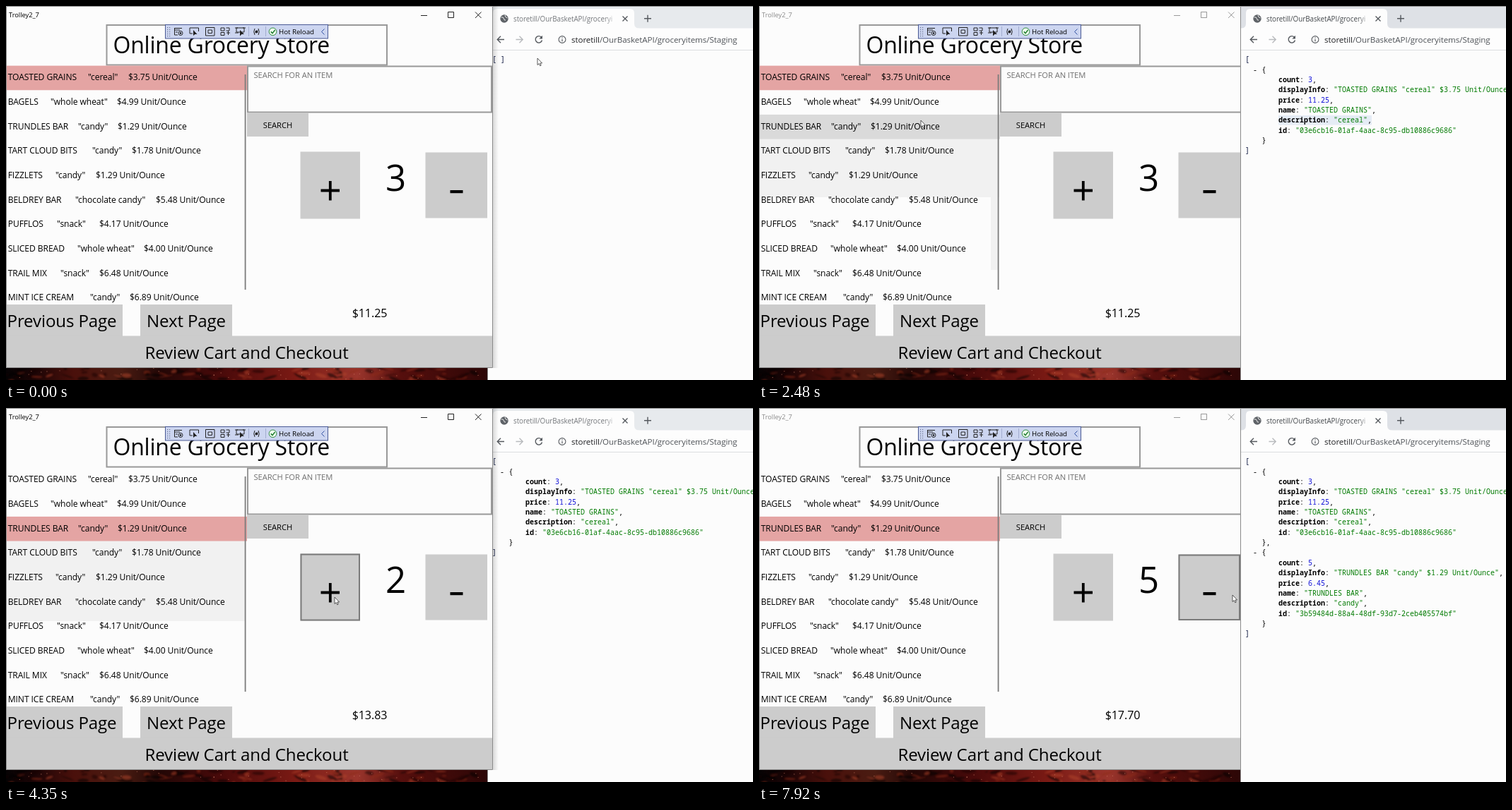
Recreate the animation shown at these times as an HTML page. Size 1057x530 px, loop 8 s.

```html
<!DOCTYPE html>
<html lang="en">
<head>
<meta charset="utf-8">
<title>Grocery store demo</title>
<style>
html, body { margin: 0; width: 100%; height: 100%; overflow: hidden; background: #fcfcfc; }
svg { display: block; width: 1057px; height: 530px; }
text { font-family: "Open Sans", "Noto Sans", sans-serif; letter-spacing: -.006em; fill: #000; white-space: pre; }
.mono text { font: 500 10px "Noto Sans Mono", "DejaVu Sans Mono", monospace; letter-spacing: 0; }
.mono .key { font-weight: 700; }
.mono .str { fill: #007a00; }
.mono .num { fill: #1010d8; }
.mono .outer { fill: #061038; }
.line { fill: none; stroke: #222; stroke-width: 1; }
.nav { fill: none; stroke: #55595e; stroke-width: 1.4; }
</style>
</head>
<body>
<svg id="stage" viewBox="0 0 1057 530"></svg>
<script>
const LOOP = 8000;
const ROW_H = 34.65;
const rowTop = i => 84.6 + i * ROW_H;

const rect = (x, y, w, h, fill, extra = '') =>
  `<rect x="${x}" y="${y}" width="${w}" height="${h}" fill="${fill}" ${extra}/>`;
const frame = (x, y, w, h, color, extra = '') =>
  rect(x + 1, y + 1, w - 2, h - 2, 'none', `stroke="${color}" stroke-width="2" ${extra}`);
const text = (x, y, size, str, extra = '') =>
  `<text x="${x}" y="${y}" font-size="${size}" ${extra}>${str}</text>`;
const path = (d, cls = 'line', extra = '') => `<path class="${cls}" d="${d}" ${extra}/>`;
const mid = 'text-anchor="middle"';

const items = [
  ['TOASTED GRAINS', 'cereal', 116, '3.75', 173],
  ['BAGELS', 'whole wheat', 63, '4.99', 157],
  ['TRUNDLES BAR', 'candy', 102, '1.29', 158],
  ['TART CLOUD BITS', 'candy', 122, '1.78', 178],
  ['FIZZLETS', 'candy', 70, '1.29', 127],
  ['BELDREY BAR', 'chocolate candy', 98, '5.48', 212],
  ['PUFFLOS', 'snack', 72, '4.17', 132],
  ['SLICED BREAD', 'whole wheat', 101, '4.00', 195],
  ['TRAIL MIX', 'snack', 77, '6.48', 132],
  ['MINT ICE CREAM', 'candy', 119, '6.89', 175]
];

function wallpaper() {
  let seed = 7;
  const rnd = () => (seed = seed * 16807 % 2147483647) / 2147483647;
  const tones = ['#000', '#180304', '#8c2a18', '#050102', '#b0442c'];
  const stops = [[0, '#060304'], [.06, '#1c0506'], [.14, '#4a100b'], [.24, '#4a1c12'], [.32, '#220706'],
    [.45, '#4a0a0a'], [.6, '#7a1a14'], [.73, '#9a352c'], [.82, '#560f0d'], [1, '#2c0606']];
  let out = `<defs><linearGradient id="sky">${stops.map(([o, c]) =>
    `<stop offset="${o}" stop-color="${c}"/>`).join('')}</linearGradient>
    <filter id="soft"><feGaussianBlur stdDeviation="1"/></filter></defs>` + rect(0, 505, 681, 25, 'url(#sky)');
  out += '<g filter="url(#soft)" opacity=".5">';
  for (let i = 0; i < 110; i++) {
    const x = rnd() * 670, y = 511 + rnd() * 20;
    out += `<ellipse cx="${x}" cy="${y}" rx="${2 + rnd() * 9}" ry="${.6 + rnd() * 2.4}" fill="${tones[i % 5]}" transform="rotate(${rnd() * 50 - 25} ${x} ${y})"/>`;
  }
  out += '</g>';
  for (let i = 0; i < 40; i++) out += `<circle cx="${rnd() * 681}" cy="${513 + rnd() * 16}" r=".6" fill="#d98a70" opacity=".7"/>`;
  return out;
}

function debugBar() {
  let dots = '';
  for (let i = 0; i < 10; i++) dots += rect(228 + i % 2 * 3, 30 + (i >> 1) * 3, 1.2, 1.2, '#6f7896');
  return rect(225.5, 26.5, 230, 19.5, '#ccd5f0', 'stroke="#4a5a94"') + dots +
    path('M238.5 31.5H249M238.5 34H246M238.5 31V41H243M240 37H243') +
    '<circle class="line" cx="247" cy="38.5" r="3"/><circle cx="247" cy="38.5" r="1.2"/>' +
    path('M264 39H260V31H272.5V36') + path('M265 34L265 42 267.5 40 270.5 40Z', '', 'fill="#222"') +
    path('M282.5 30.5H295V42H282.5ZM286 34H291.5V38.5H286Z') +
    path('M304 31H309V35H304ZM304 37.5H309V41.5H304ZM311.5 31H316V35H311.5M312 38H317M314.5 35.5V41') +
    path('M326 31H337V37H326ZM324 31H328M335 31H339M324 38H329') +
    path('M331 34L331 42.5 333.5 40 337 40Z', '', 'fill="#222"') +
    path('M343.5 29V43M367.5 29V43', 'line', 'style="stroke:#a3add0"') +
    path('M352 32Q349.5 36.5 352 41M357 32Q359.5 36.5 357 41M352.5 38L356.5 34.5') +
    '<circle cx="354.5" cy="36.5" r="2" fill="#222"/>' +
    '<circle cx="377.5" cy="36.3" r="5.3" fill="#eefbee" stroke="#2d8c3c"/>' +
    path('M374.8 36.4L377 38.6 380.6 34', 'line', 'style="stroke:#1f7d2f;stroke-width:1.5"') +
    text(386, 39.6, 9.8, 'Hot Reload') + path('M450.5 32.5L446.5 36.5 450.5 40.5', 'line', 'style="stroke:#2f4ea0"');
}

function appWindow() {
  const rows = items.map(([name, kind, kx, price, px], i) => {
    const y = rowTop(i) + 20.8;
    return text(2.7, y, 12.1, name) + text(kx, y, 12.1, `"${kind}"`) + text(px, y, 12.1, `$${price} Unit/Ounce`);
  }).join('');
  return `<defs><linearGradient id="shade"><stop stop-opacity=".16"/><stop offset="1" stop-opacity="0"/></linearGradient></defs>` +
    rect(688, 0, 9, 513, 'url(#shade)') + rect(0, 0, 688.5, 513, '#fcfcfc') +
    `<g id="caption">${text(4, 16, 9.4, 'Trolley2_7')}
      ${path('M587 13.5H596M625.5 8.5H633.5V16.5H625.5ZM664 8.5L672.5 17M672.5 8.5L664 17')}</g>` +
    frame(141.5, 26, 398.5, 58.5, '#999') + text(151.5, 67, 31.95, 'Online Grocery Store') + debugBar() +
    `<g id="ghost1">${rect(0, 223, 340, 48, '#f1f1f1')}${rect(328, 271, 10, 103, '#f1f1f1')}</g>` +
    `<g id="ghost2">${rect(0, 188, 340, 35, '#f1f1f1')}</g>` +
    `<g id="ghost3">${rect(0, 188, 338, 114, '#f1f1f1')}</g>` +
    rect(0, 0, 341, ROW_H, '#dadada', 'id="hover"') + rect(0, 0, 341, ROW_H, '#e4a4a3', 'id="selected"') +
    rows + rect(337.7, 97, 1.8, 305, '#7c7c7c') +
    frame(341, 84.5, 347, 67, '#999', 'id="searchBox"') +
    text(350.5, 101.6, 11.2, 'SEARCH FOR AN ITEM', 'style="fill:#707070"') +
    rect(341, 152, 87, 33, '#ccc') + text(384.5, 172.6, 11.2, 'SEARCH', mid) +
    rect(416.5, 206.5, 84.5, 95, '#ccc', 'id="plus"') + frame(416.5, 206.5, 84.5, 95, '#7a7a7a', 'id="plusEdge"') +
    path('M445.5 261.5H472M458.8 248V275.5', 'line', 'style="stroke:#000;stroke-width:3.8"') +
    rect(593.5, 207.5, 87.5, 93, '#ccc') + frame(593.5, 207.5, 87.5, 93.5, '#7a7a7a', 'id="minusEdge"') +
    rect(628.5, 261, 18, 4.2, '#000') +
    text(551.5, 262, 51, '', mid + ' id="count"') + text(514.5, 440.5, 16.1, '', mid + ' id="total"') +
    rect(0, 423, 165, 45, '#ccc') + rect(190, 423, 130, 45, '#ccc') + rect(0, 467.5, 688, 45, '#ccc') +
    text(79, 455, 24.1, 'Previous Page', mid) + text(255, 455, 24.1, 'Next Page', mid) +
    text(340.5, 500, 24.1, 'Review Cart and Checkout', mid) +
    path('M.5 513V.5H688.5V512.5H0', 'line', 'style="stroke:#8a8a8a"');
}

const lineY = i => 79.3 + i * 14.35;
const code = (x, line, str, cls = '') => `<text x="${x}" y="${lineY(line)}" class="${cls}">${str}</text>`;

function cartEntry(start, item, count, cost, id, comma) {
  const [name, kind, , price] = items[item];
  const quote = s => [`"${s}"`, 'str'];
  const fields = [
    ['count', [count, 'num']],
    ['displayInfo', quote(`${name} "${kind}" $${price} Unit/Ounce`)],
    ['price', [cost, 'num']],
    ['name', quote(name)],
    ['description', quote(kind)],
    ['id', quote(id)]
  ];
  return code(699, start, '-') + code(711.5, start, '{') +
    fields.map(([key, [value, cls]], i) => code(735, start + 1 + i,
      `<tspan class="key">${key}</tspan>: <tspan class="${cls}">${value}</tspan>${i < 5 ? ',' : ''}`)).join('') +
    code(711.5, start + 7, '}' + comma);
}

function browser() {
  const first = comma => cartEntry(1, 0, 3, '11.25', '03e6cb16-01af-4aac-8c95-db10886c9686', comma);
  const second = cartEntry(9, 2, 5, '6.45', '3b59484d-88a4-48df-93d7-2ceb405574bf', '');
  const open = code(688, 0, '[', 'outer');
  const close = line => code(688, line, ']', 'outer');
  return `<defs><linearGradient id="fade"><stop stop-color="#fdfdfd" stop-opacity="0"/><stop offset="1" stop-color="#fdfdfd"/></linearGradient></defs>` +
    rect(681, 0, 376, 530, '#fcfcfc') + rect(681, 0, 376, 32, '#dee1e6', 'id="strip"') +
    path('M681 32Q689 32 689 25V10Q689 4 695 4H883Q889 4 889 10V25Q889 32 897 32Z', '', 'fill="#fdfdfd"') +
    '<circle cx="705" cy="18" r="5.7" fill="#5f6368"/>' +
    path('M700.5 16Q704 15 704.5 18T707 20M706 13Q706 16 709.5 17', 'line', 'style="stroke:#eee"') +
    text(718, 21.5, 9.9, 'storetill/OurBasketAPI/groceryi', 'id="tabTitle"') +
    rect(846, 8, 20, 20, 'url(#fade)') + rect(864, 8, 6, 20, '#fdfdfd') +
    path('M872.5 14.5L879.5 21.5M879.5 14.5L872.5 21.5', 'nav') +
    path('M903 17.8H913M908 12.8V22.8', 'nav') +
    rect(681, 31.5, 376, 31, '#fdfdfd') + rect(681, 62, 376, 1, '#dcdee0') +
    '<circle id="reloadHover" cx="754" cy="47.5" r="11.5" fill="#d9dbde"/>' +
    path('M705 47.5H695.5M700 42.8L695.3 47.5 700 52.2', 'nav') +
    path('M721.5 47.5H731M726.5 42.8L731.2 47.5 726.5 52.2', 'nav', 'style="stroke:#b9bbbe"') +
    path('M757.5 44.3A4.7 4.7 0 1 0 758.5 48.5', 'nav') + path('M759 41.8V46.5H754.3Z', '', 'fill="#55595e"') +
    '<circle class="nav" cx="787" cy="47.5" r="4.9" style="stroke-width:1.1"/>' +
    path('M787 47V50.3M787 44.5V45.7', 'nav', 'style="stroke-width:1.2"') +
    text(800, 51.6, 11.6, '<tspan fill="#202124">storetill</tspan>/OurBasketAPI/groceryitems/Staging', 'style="fill:#4f5358"') +
    rect(735, 155, 132, 13.5, '#e5ecf5', 'id="lineHover"') +
    `<g class="mono"><g id="json0">${open}${code(700, 0, ']', 'outer')}</g>
      <g id="json1">${open}${first('')}${close(9)}</g>
      <g id="json2">${open}${first(',')}${second}${close(17)}</g></g>` +
    path('M681.5 530V.5H1057', 'line', 'style="stroke:#8a8a8a"');
}

// Each step holds only what changes at its time.
const steps = [
  { t: 0, at: [752, 74], app: 1, json: 0, sel: 0, hov: -1, n: 3, ghost: 0 },
  { t: 120, at: [753, 66] }, { t: 250, at: [754, 54], reload: 1 }, { t: 380, at: [756, 46] }, { t: 510, at: [758, 43] },
  { t: 780, app: 0 }, { t: 910, json: 1 },
  { t: 1290, at: [757, 70], reload: 0 }, { t: 1420, at: [752, 120] }, { t: 1545, at: [742, 162], line: 1 },
  { t: 1670, at: [640, 270] }, { t: 1800, at: [503, 362] },
  { t: 1920, at: [333, 288], hov: 5 }, { t: 2070, at: [259, 196], hov: 3, ghost: 1 },
  { t: 2220, at: [240, 152], hov: 1, ghost: 2 }, { t: 2350, at: [230, 142] },
  { t: 2480, at: [229, 162], hov: 2 }, { t: 2600, at: [232, 175] },
  { t: 3130, app: 1, sel: 2, hov: -1, n: 0, line: 0, ghost: 3 },
  { t: 3260, at: [270, 190] }, { t: 3400, at: [352, 230] },
  { t: 3530, at: [432, 260], plus: 1 }, { t: 3670, at: [465, 268] }, { t: 3920, plus: 2 },
  { t: 4070, n: 1, plus: 1 }, { t: 4200, plus: 2 }, { t: 4330, n: 2, plus: 1 }, { t: 4460, plus: 2 },
  { t: 4590, n: 3, plus: 1 }, { t: 4720, n: 4 }, { t: 4850, plus: 2 }, { t: 4980, n: 5, plus: 1 },
  { t: 5130, at: [504, 248], plus: 0 }, { t: 5270, at: [546, 223] }, { t: 5400, at: [610, 140], search: 1 },
  { t: 5530, at: [720, 72], search: 0 }, { t: 5660, at: [845, 38] }, { t: 5790, at: [758, 43], reload: 1 },
  { t: 6060, app: 0, ghost: 0 }, { t: 6350, json: 2 },
  { t: 6900, at: [766, 58] }, { t: 7030, at: [785, 95], reload: 0 }, { t: 7155, at: [802, 150] },
  { t: 7280, at: [807, 215] }, { t: 7410, at: [790, 270] }, { t: 7535, at: [750, 292] },
  { t: 7665, at: [708, 286] }, { t: 7790, at: [680, 272], minus: 1 }, { t: 7920, at: [670, 265] }
];

const stage = document.getElementById('stage');
stage.innerHTML = wallpaper() + `<g id="web">${browser()}</g><g id="app">${appWindow()}</g>` +
  '<path id="cursor" d="M0 0V9.5L2.2 7.6 3.7 10.8 5.2 10.1 3.8 7H6.6Z" fill="#fff" stroke="#333" stroke-width=".8"/>';

const el = {};
stage.querySelectorAll('[id]').forEach(node => { el[node.id] = node; });
const show = (id, on) => { el[id].style.display = on ? '' : 'none'; };
const placeRow = (id, i) => { show(id, i >= 0); el[id].setAttribute('y', rowTop(Math.max(i, 0))); };

function draw(s) {
  stage.insertBefore(s.app ? el.app : el.web, el.cursor);
  el.caption.setAttribute('opacity', s.app ? 1 : .45);
  el.strip.setAttribute('fill', s.app ? '#e7eaed' : '#dee1e6');
  el.tabTitle.style.fill = s.app ? '#74777b' : '#45494d';
  for (let i = 0; i < 3; i++) show('json' + i, s.json === i);
  show('ghost1', s.ghost === 1 || s.ghost === 2);
  show('ghost2', s.ghost === 2);
  show('ghost3', s.ghost === 3);
  placeRow('selected', s.sel);
  placeRow('hover', s.hov);
  show('reloadHover', s.reload);
  show('lineHover', s.line);
  show('plusEdge', s.plus === 1);
  show('minusEdge', s.minus);
  el.plus.setAttribute('fill', s.plus === 2 ? '#999' : '#ccc');
  el.searchBox.setAttribute('stroke', s.search ? '#666' : '#999');
  el.count.textContent = s.n;
  el.total.textContent = '$' + (11.25 + (s.sel === 2 ? s.n * 1.29 : 0)).toFixed(2);
  el.cursor.setAttribute('transform', `translate(${s.at})`);
}

let shown = -1;
function tick() {
  const t = performance.now() % LOOP;
  const count = steps.filter(s => s.t <= t).length;
  if (count !== shown) {
    draw(Object.assign({}, ...steps.slice(0, count)));
    shown = count;
  }
  requestAnimationFrame(tick);
}
tick();
</script>
</body>
</html>
```
